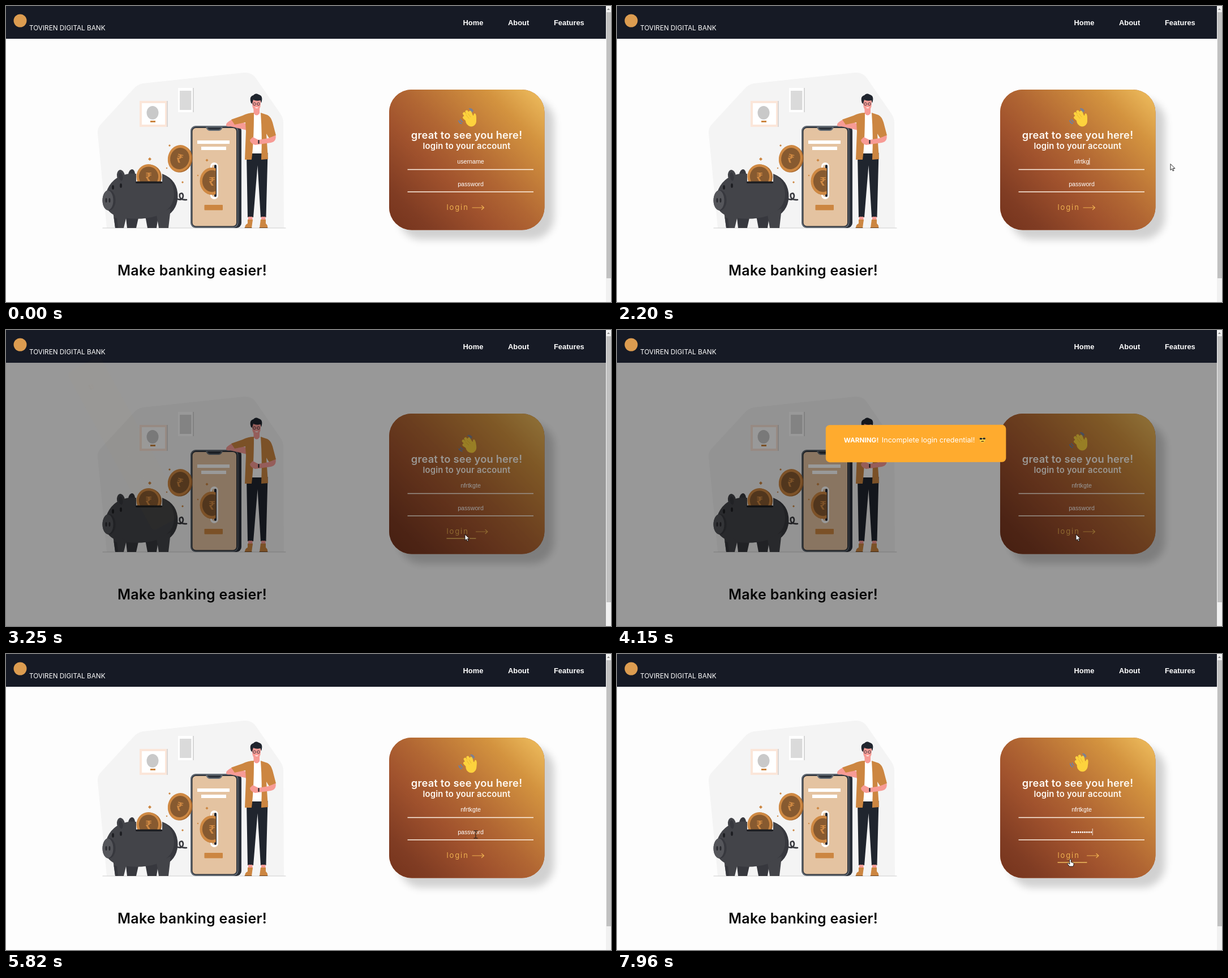
Recreate the animation shown at these times as an HTML page with a canvas. Size 1069x524 px, loop 8 s.

```html
<!DOCTYPE html>
<html lang="en">
<head>
<meta charset="utf-8">
<title>Digital bank login</title>
<style>
html, body { margin: 0; width: 100%; height: 100%; overflow: hidden; background: #fdfdfd; }
canvas { display: block; }
</style>
</head>
<body>
<canvas id="stage" width="1069" height="524"></canvas>
<script>
const W = 1069, H = 524, NAV = 58, LOOP = 8000;
const SANS = 'Inter, "Open Sans", sans-serif';
const ARIAL = '"Liberation Sans", Arial, sans-serif';
const ORANGE = '#cc8641', BROWN = '#875a30', INK = '#20252e', SKIN = '#f79b95', PIG = '#434449', PIG_DARK = '#37383e';
const GOLD = '#eeb050', HAND = '#fdd23d';
const stage = document.getElementById('stage').getContext('2d');
let g = stage;

// Drawing helpers
const clamp = (v, a = 0, b = 1) => Math.min(b, Math.max(a, v));
function rect(color, x, y, w, h, r = 0) {
  g.fillStyle = color;
  g.beginPath();
  g.roundRect(x, y, w, h, r);
  g.fill();
}
function oval(color, x, y, rx, ry = rx, rot = 0) {
  g.fillStyle = color;
  g.beginPath();
  g.ellipse(x, y, rx, ry, rot, 0, Math.PI * 2);
  g.fill();
}
function shape(color, d) {
  g.fillStyle = color;
  g.fill(new Path2D(d));
}
function line(color, width, d) {
  g.strokeStyle = color;
  g.lineWidth = width;
  g.lineCap = g.lineJoin = 'round';
  g.stroke(new Path2D(d));
}
function text(str, x, y, font, color, align = 'left', spacing = 0) {
  g.font = font;
  g.fillStyle = color;
  g.textAlign = align;
  g.letterSpacing = spacing + 'px';
  g.fillText(str, x, y);
  const w = g.measureText(str).width;
  g.letterSpacing = '0px';
  return w;
}
function saved(fn) {
  g.save();
  fn();
  g.restore();
}

// CSS "ease": cubic-bezier(.25, .1, .25, 1)
function ease(x) {
  x = clamp(x);
  let lo = 0, hi = 1, s = x;
  for (let i = 0; i < 24; i++) {
    s = (lo + hi) / 2;
    const bx = .75 * s * (1 - s) * (1 - s) + .75 * s * s * (1 - s) + s ** 3;
    if (bx < x) lo = s; else hi = s;
  }
  return .3 * s * (1 - s) * (1 - s) + 3 * s * s * (1 - s) + s ** 3;
}

function drawNav() {
  rect('#161a25', 0, 0, 1060, NAV);
  oval('#dc9c50', 25, 26, 11.5);
  text('TOVIREN DIGITAL BANK', 41, 42.5, '400 11.75px ' + SANS, '#fff');
  const font = 'bold 12.9px ' + ARIAL;
  text('Home', 807.5, 34, font, '#fff');
  text('About', 887, 34, font, '#fff');
  text('Features', 968, 34, font, '#fff');
  rect('#f1f1f1', 1060, 0, 9, H);
  rect('#c1c1c1', 1061, 11, 8, 471);
  shape('#8a8a8a', 'M1062 7L1064.5 4L1067 7Z');
}

function drawWall() {
  shape('#f4f4f4', 'M178 393L174 350L162 226Q161 217 167 210L226 146Q232 139 242 137L420 118Q434 117 441 127L485 191Q490 198 490 207L491 393Z');
  line('#cfcfcf', 1.2, 'M171 393H494');
  rect('#d9d6d5', 282, 168, 4, 46);
  rect('#fbe6d9', 236, 168, 48, 46);
  rect('#fff', 240, 172, 41, 38);
  oval('#c9c9c9', 259, 189, 10.5, 12);
  rect(ORANGE, 255, 203, 9, 3);
  rect('#d6d6d6', 329, 145, 3, 43);
  rect('#fff', 304, 145, 26, 43);
  rect('#dadada', 307, 150, 20.5, 34);
}

function drawCoin(x, y, rx, ry, rot) {
  saved(() => {
    g.translate(x, y);
    g.rotate(rot);
    oval('#a96a30', 1, .5, rx, ry);
    oval('#cf8943', -.5, 0, rx - 1, ry);
    oval(BROWN, 0, 0, rx * .78, ry * .8);
    text('₹', 0, 7.5, 'bold 21px "Noto Sans", "DejaVu Sans", sans-serif', '#cf8943', 'center');
  });
}

function drawPhone() {
  rect('#2a2f38', 330, 212, 86, 181, 9);
  rect('#626a73', 326, 212, 84.5, 181, 9);
  rect('#2f343c', 328, 214, 81, 177, 8);
  rect('#e4c3a1', 329.5, 216, 77.5, 173.5, 6);
  shape('#626a73', 'M353 214H383Q381 221 376 221H360Q355 221 353 214Z');
  shape('#2f343c', 'M356 215H380Q379 219 375 219H361Q357 219 356 215Z');
  rect('#fff', 338, 238, 57, 6);
  rect('#fff', 345, 249, 44, 6);
  rect('#fff', 361, 277, 14, 65, 7);
  rect('#e4c3a1', 364, 281, 8, 57, 4);
  rect('#1f2733', 368, 281, 4, 57, 2);
  saved(() => {
    g.beginPath();
    g.rect(335, 278, 35.5, 70);
    g.clip();
    drawCoin(364, 310, 22, 24, 0);
  });
  rect(ORANGE, 350.5, 352, 32.5, 9.5, 1);
}

function drawPig() {
  saved(() => {
    g.beginPath();
    g.rect(225, 270, 55, 42);
    g.clip();
    drawCoin(252, 302, 22, 22, 0);
  });
  line(PIG_DARK, 2.6, 'M301 341Q312 346 313 336Q312 329 307 333Q305 344 319 343');
  shape(PIG_DARK, 'M211 366H236L230 393H214ZM245 366H270L266 393H250Z');
  oval(PIG_DARK, 222, 299, 6, 10, .1);
  shape(PIG_DARK, 'M230 297V311H276V297Q304 308 303.5 338Q302 366 276 375L220 376Z');
  shape(PIG, 'M177 330Q186 303 214 297.5Q222 296 230 297V311H276V298Q296 306 297 332Q298 358 268 371Q240 380 208 375Q186 372 178 358Z');
  shape(PIG, 'M189 364L193 393H208L213 372ZM266 370L270 393H287L291 358Z');
  shape(PIG_DARK, 'M190.5 374L193 393H198L196 376Z');
  oval(PIG, 203, 301, 7, 11, -.15);
  oval(PIG_DARK, 203, 302, 3.5, 7.5, -.15);
  oval(PIG_DARK, 182, 344, 11.5, 18);
  oval('#55565b', 180, 344, 9.5, 17.5);
  oval('#292a2f', 177, 344, 1.5, 4);
  oval('#292a2f', 183, 344, 1.5, 4);
  oval('#1d1e22', 189, 321, 2, 4);
  oval('#1d1e22', 203, 318, 2, 4);
  rect('#1d1e22', 229, 310.5, 47, 3.5, 2);
}

function drawMan() {
  shape(INK, 'M425 260H462.5L459.5 374H450L444.5 282L437 374H427Z');
  rect(SKIN, 428, 373, 7.5, 9);
  rect(SKIN, 451, 373, 7.5, 9);
  shape(ORANGE, 'M422 393Q422 387 427 385V378H436L434 393ZM448 393L450 378H459V385Q463 388 462 393Z');
  line('#70451f', 1, 'M422 392.5H434M448 392.5H462');
  rect('#fff', 433, 191, 20, 70);
  shape(SKIN, 'M437.5 180H448V190Q443 197 437.5 190Z');
  shape(SKIN, 'M399 201Q388 207 389 211Q390 214 396 213L426 220Q435 222 435 216Q432 210 424 208Z');
  shape(ORANGE, 'M438 189Q428 189 418 194L398 201L404 210L423 206L424 222L422 272L434 272Q438 240 438 189Z');
  shape(ORANGE, 'M450 189L462 193Q468 196 471 206L477 229L465 234L460 226L463 271L451 272Q453 230 450 189Z');
  shape(SKIN, 'M464 234L476.5 229Q478 240 468 242L440 246Q431 243 431 237L436 232L446 237Z');
  line(INK, 2.2, 'M446.5 238V243');
  shape(SKIN, 'M434.5 168Q442 162 450 168L449.5 178Q447 186 442.5 186Q437 185 435.5 178Z');
  shape(INK, 'M433 172Q429 160 437 158Q441 153 447 157Q455 159 451 172L449.5 167Q442 169 437 166L435 173Z');
  line(INK, .8, 'M436.4 173.5a2.4 2.4 0 1 0 4.8 0a2.4 2.4 0 1 0 -4.8 0M443.6 173.5a2.4 2.4 0 1 0 4.8 0a2.4 2.4 0 1 0 -4.8 0');
  shape('#fff', 'M439.5 179.5H446Q443.5 182.5 439.5 179.5Z');
}

function drawCard() {
  saved(() => {
    g.shadowColor = 'rgba(0,0,0,.175)';
    g.shadowBlur = 14;
    g.shadowOffsetX = g.shadowOffsetY = 17;
    rect('#a9592f', 677, 148, 274.5, 248.5, 40);
  });
  const k = 130.6, grad = g.createLinearGradient(814 - k, 272 + k, 814 + k, 272 - k);
  [[0, '#74331c'], [.14, '#803c23'], [.36, '#a0522d'], [.52, '#b16633'], [.8, '#d3933f'], [1, '#f0c060']]
    .forEach(([p, c]) => grad.addColorStop(p, c));
  rect(grad, 677, 148, 274.5, 248.5, 40);
  text('great to see you here!', 814, 234.5, '600 18.3px ' + SANS, '#fffaf3', 'center', .2);
  text('login to your account', 814, 253, '600 14.8px ' + SANS, '#fffaf3', 'center', .2);
  rect('#fff3e6', 709.5, 288.7, 222.5, 1.6);
  rect('#fff3e6', 709.5, 328.2, 222.5, 1.6);
  text('login', 778.5, 361, '400 13px ' + SANS, GOLD, 'left', 1.9);
}

function drawPage() {
  rect('#fdfdfd', 0, 0, W, H);
  drawWall();
  drawPhone();
  drawPig();
  drawCoin(307, 270, 21.5, 24, .25);
  for (const [x, y, r] of [[254, 271, 3], [289, 247, 2], [355, 273, 2.5], [312, 312, 2], [284, 287, 1.5], [339, 300, 1.5]])
    shape(ORANGE, `M${x} ${y - r}l${r} ${r}l${-r} ${r}l${-r} ${-r}Z`);
  drawMan();
  drawCard();
  text('Make banking easier!', 197, 476.5, '600 25px ' + SANS, '#080808', 'left', .3);
  drawNav();
}

// Moving parts
const SWING = [0, 14, -8, 14, -4, 10, 0];
function drawWave(t) {
  const p = ((t - 790 + 2060) % 2060) / 206, i = Math.floor(p);
  const deg = i < 6 ? SWING[i] + (SWING[i + 1] - SWING[i]) * ease(p - i) : 0;
  saved(() => {
    g.translate(852, 204);
    g.rotate(deg * Math.PI / 180);
    g.translate(-852, -204);
    line('#6680ad', 1.8, 'M800 203Q801 207 805 208M803 201Q804 204 806.5 205M819 182Q823 182 825 186M821 185Q822 186 823 188');
    line(HAND, 5, 'M820 207L809.5 197.5M820 204L809.5 190.5M822 202L814 187M825 201L820 188');
    oval(HAND, 821.5, 203, 9.5, 10.5, -.3);
    shape(HAND, 'M823 194L826 198Q825.5 190 828.5 190Q831.5 191 831 203Q830 212 823 213Z');
    line('#e3a92c', .7, 'M813 193L818 199M816.5 190.5L821 196.5');
  });
}

const HOVERS = [[2850, 3250], [4230, 4600], [7300, 9000]];
function drawLogin(t) {
  let h = 0;
  for (const [on, off] of HOVERS) h = Math.max(h, ease((t - on) / 300) * (1 - ease((t - off) / 250)));
  if (h > .01) rect('#f0bd5e', 778.5, 368.2, 52 * h, 1.6);
  saved(() => {
    g.translate(6.5 * h, 0);
    line(GOLD, 1.2, 'M824 357H844.5M840.5 353.5L844.5 357L840.5 360.5');
  });
}

function drawField(hint, value, y, caretAge) {
  const w = text(value || hint, 821, y, '10.7px ' + ARIAL, '#fff', 'center');
  if (caretAge >= 0 && caretAge % 1060 < 530) rect('#f3e4d8', 821 + (value ? w / 2 : 0), y - 10, 1, 12);
}
const typed = (t, from, to, n) => clamp(Math.floor((t - from) / (to - from) * n) + 1, 0, n);
function drawFields(t) {
  const a = typed(t, 1630, 2400, 8), b = typed(t, 6050, 6720, 10);
  const nameAge = t < 1630 ? t - 810 : t < 2900 ? Math.max(0, t - 2400) : -1;
  const passAge = b ? Math.max(0, t - 6720) : t - 5880;
  drawField('username', 'nfrtkgte'.slice(0, a), 279, nameAge);
  drawField('password', '•'.repeat(b), 319, passAge);
}

function drawAlert(t) {
  const p = ease((t - 3230) / 950);
  saved(() => {
    g.globalAlpha = p;
    g.translate(528 - 319 * (1 - p), 201);
    g.rotate(-(1 - p) * Math.PI * 2 / 3);
    g.translate(-528, -201);
    rect('#ffab2e', 369, 168, 318.5, 66, 7);
    text('WARNING!', 401, 199, '700 11.7px ' + SANS, '#fff');
    text('Incomplete login credential!', 468, 199, '400 12.6px ' + SANS, '#fff');
    oval('#ffd34a', 646, 195, 4.8);
    rect('#2b2b2b', 641, 191, 4.5, 3, 1);
    rect('#2b2b2b', 646.5, 191, 4.5, 3, 1);
    rect('#5b3d12', 643.5, 196.5, 5, 1.5, .7);
  });
}

const PATH = [[120, 1013, 450], [540, 872, 286], [880, 872, 286], [1290, 961, 273], [1500, 978, 280], [2470, 978, 280],
  [2920, 811, 362], [4350, 811, 362], [4650, 832, 357], [5100, 832, 357], [5650, 830, 319.5], [6990, 830, 319.5],
  [7320, 815, 388], [7460, 815, 388], [7700, 801, 364], [8000, 801, 364]];
function drawCursor(t, dimmed) {
  if (t < 120) return;
  const i = PATH.findIndex(p => p[0] > t), [t0, x0, y0] = PATH[i - 1], [t1, x1, y1] = PATH[i];
  const u = (t - t0) / (t1 - t0), k = u * u * (3 - 2 * u);
  const x = x0 + (x1 - x0) * k, y = y0 + (y1 - y0) * k;
  const inField = x > 710 && x < 932 && ((y > 264 && y < 290) || (y > 304 && y < 330));
  const onLink = x > 776 && x < 824 && y > 346 && y < 372;
  if (t >= 3110 && t < 3250) oval('rgba(220,190,0,.72)', 811, 362, 9);
  saved(() => {
    g.translate(x, y);
    if (!dimmed && inField) {
      line('#3a2a20', 1.4, 'M-3 -6.5H-.8M.8 -6.5H3M0 -6V6M-3 6.5H-.8M.8 6.5H3');
    } else {
      const d = !dimmed && onLink
        ? 'M-1.3 0Q0 -1.5 1.3 0V4.5L5 5.5Q6.5 6 6 9L5 12H-1.5L-5 7.5Q-5 5.5 -3 6.5L-1.3 8Z'
        : 'M0 0V10.5L2.5 8.2L4.2 12L6 11.2L4.3 7.5H7.5Z';
      shape('#fff', d);
      line('#111', .9, d);
    }
  });
}

const page = document.createElement('canvas');
page.width = W;
page.height = H;
g = page.getContext('2d');
drawPage();
g = stage;

function draw(t) {
  const dimmed = t >= 3250 && t < 4280;
  g.drawImage(page, 0, 0);
  drawWave(t);
  drawFields(t);
  drawLogin(t);
  if (dimmed) {
    rect('rgba(0,0,0,.4)', 0, NAV, 1060, H - NAV);
    drawAlert(t);
  }
  drawCursor(t, dimmed);
}

const start = performance.now();
function tick() {
  draw((performance.now() - start) % LOOP);
  requestAnimationFrame(tick);
}
tick();
</script>
</body>
</html>
```
